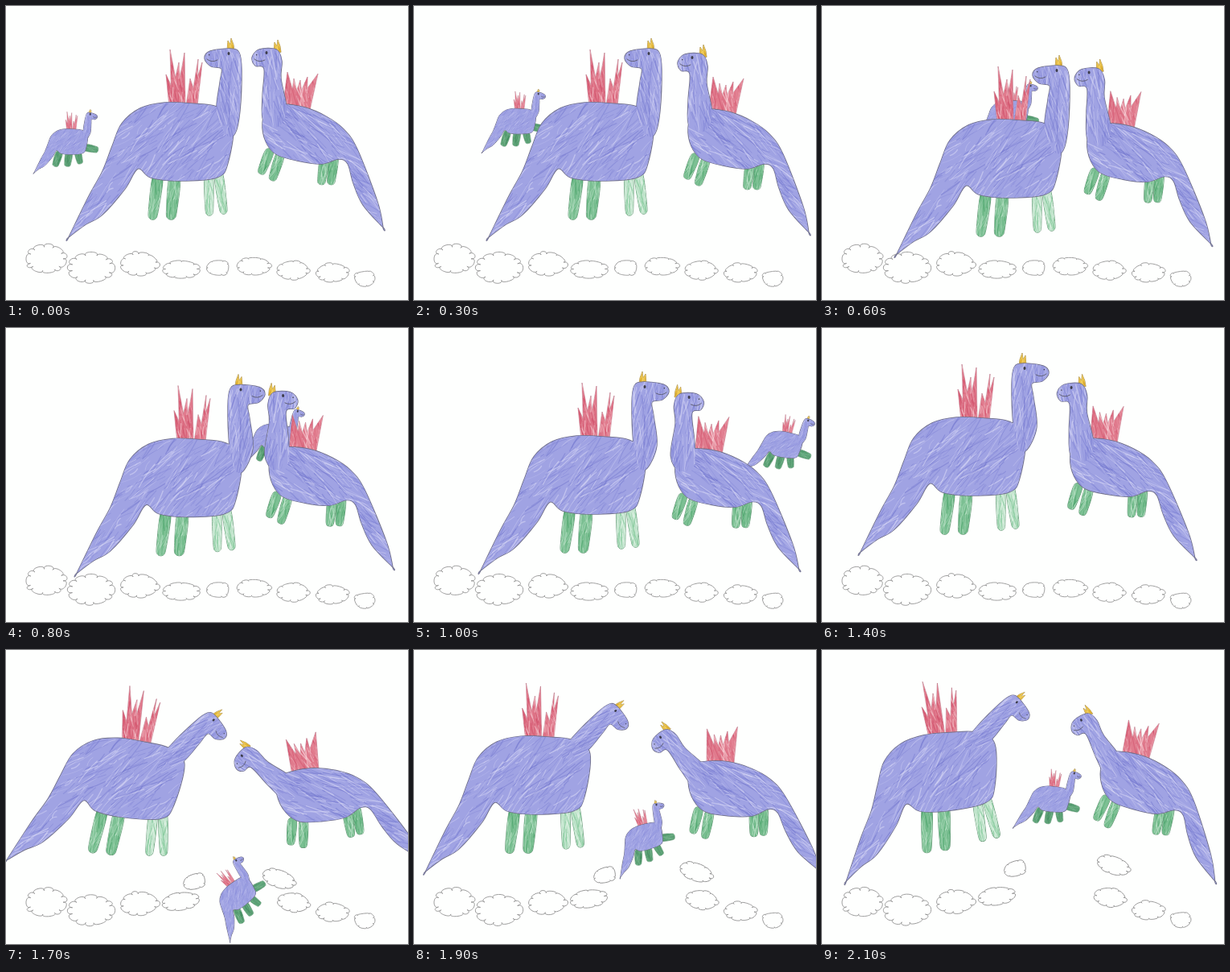
Write an HTML page with a canvas that moves like this. It is 500 px wide and 365 px high and loops after 2300 ms.

```html
<!DOCTYPE html>
<html lang="en">
<head>
<meta charset="utf-8">
<title>Flying dinosaurs</title>
<style>
html, body { margin: 0; width: 100%; height: 100%; overflow: hidden; background: #fefffe; }
canvas { display: block; }
</style>
</head>
<body>
<canvas id="stage" width="500" height="365"></canvas>
<script>
const ctx = document.getElementById('stage').getContext('2d');
const LOOP = 2300, STEP = 100, LAST = 2100;

// base, dark and light crayon tones
const BLUE = ['#a0a3e3', '#7579cf', '#dcdcf6'];
const RED = ['#e07b8d', '#cd4763', '#f9d8dd'];
const GREEN = ['#7cc093', '#3f9b60', '#cdead6'];
const DEEP = ['#5da377', '#2b7549', '#9accaa'];
const PALE = ['#bfe3ca', '#73c08d', '#f2faf4'];
const GOLD = ['#ecc344', '#cb9a28', '#f7df8a'];

const ramp = (t, a, b) => Math.max(0, Math.min(1, (t - a) / (b - a)));

function random(seed) {
  return () => {
    seed = (seed * 16807 + 11) % 2147483647;
    return seed / 2147483647;
  };
}

// Closed spline through the points; a doubled point is a sharp corner.
function spline(p) {
  const path = new Path2D(), n = p.length / 2;
  const at = i => [p[((i + n) % n) * 2], p[((i + n) % n) * 2 + 1]];
  path.moveTo(...at(0));
  for (let i = 0; i < n; i++) {
    const [a, b, c, d] = [at(i - 1), at(i), at(i + 1), at(i + 2)];
    path.bezierCurveTo(b[0] + (c[0] - a[0]) / 6, b[1] + (c[1] - a[1]) / 6,
      c[0] - (d[0] - b[0]) / 6, c[1] - (d[1] - b[1]) / 6, ...c);
  }
  return path;
}

function polygon(p) {
  const path = new Path2D();
  for (let i = 0; i < p.length; i += 2) path.lineTo(p[i], p[i + 1]);
  path.closePath();
  return path;
}

// A crayon-filled shape with its hatching worked out once.
function shape(p, colors, angle, build = spline) {
  const xs = p.filter((v, i) => i % 2 === 0), ys = p.filter((v, i) => i % 2);
  const x = Math.min(...xs), y = Math.min(...ys);
  const w = Math.max(...xs) - x, h = Math.max(...ys) - y;
  const rnd = random(6839 + Math.round(w * h));
  const hatch = [];
  const count = Math.min(480, 14 + w * h / 32);
  for (let i = 0; i < count; i++) {
    const a = angle + (rnd() - 0.5) * 0.7, len = 4 + rnd() * Math.min(18, Math.max(w, h) / 4);
    const cx = x + rnd() * w, cy = y + rnd() * h;
    const dx = Math.cos(a) * len, dy = Math.sin(a) * len, bow = (rnd() - 0.5) * 5;
    const line = new Path2D();
    line.moveTo(cx - dx, cy - dy);
    line.quadraticCurveTo(cx + bow, cy + bow, cx + dx, cy + dy);
    hatch.push({ line, dark: rnd() < 0.55, alpha: 0.2 + rnd() * 0.4, width: 0.6 + rnd() * 0.9 });
  }
  return { path: build(p), colors, hatch };
}

function edge(s, color, width) {
  ctx.strokeStyle = color;
  ctx.lineWidth = width;
  ctx.stroke(s.path);
}

function fill(s) {
  ctx.save();
  ctx.clip(s.path);
  ctx.fillStyle = s.colors[0];
  ctx.fill(s.path);
  for (const m of s.hatch) {
    ctx.globalAlpha = m.alpha;
    ctx.strokeStyle = s.colors[m.dark ? 1 : 2];
    ctx.lineWidth = m.width;
    ctx.stroke(m.line);
  }
  ctx.restore();
}

// A leg from hip to rounded foot.
function leg(x1, y1, x2, y2, w, colors) {
  const angle = Math.atan2(y2 - y1, x2 - x1), len = Math.hypot(x2 - x1, y2 - y1);
  const at = (along, side) => [
    x1 + Math.cos(angle) * along - Math.sin(angle) * side,
    y1 + Math.sin(angle) * along + Math.cos(angle) * side
  ];
  const r = w / 2;
  return shape([...at(0, r), ...at(len * 0.8, r), ...at(len, r * 0.6), ...at(len, -r * 0.6),
    ...at(len * 0.8, -r), ...at(0, -r)], colors, angle);
}

// Flames rising from a base line to each tip, with valleys between.
function spikes(x0, x1, base, ...tips) {
  const p = [x0, base];
  tips.forEach(([x, y], i) => {
    p.push(x, y);
    const next = tips[i + 1];
    if (!next) return;
    const low = Math.max(y, next[1]);
    p.push((x + next[0] + (x0 + x1) / 2) / 3, low + (base - low) * 0.35);
  });
  return shape([...p, x1, base], RED, 1.45, polygon);
}

function crown(x, y) {
  return shape([x, y, x + 1, y - 12, x + 4, y - 7, x + 5, y - 15, x + 8, y - 7, x + 9, y],
    GOLD, 1.5, polygon);
}

const left = {
  center: [215, 170], pivot: [274, 117], axis: 279.5, place: [0, 0], scale: 1,
  body: shape([78, 287, 78, 287, 103, 236, 120, 205, 132, 174, 144, 146, 167, 127, 197, 120, 230, 121,
    262, 125, 283, 142, 276, 195, 262, 213, 215, 217, 180, 213, 164, 202, 148, 227, 120, 259, 98, 272],
    BLUE, -0.75),
  neck: shape([262, 132, 266, 95, 268, 78, 255, 75, 247, 65, 254, 56, 279, 53, 290, 58, 293, 80,
    291, 130, 285, 158, 274, 160], BLUE, 1.45),
  legs: [leg(189, 211, 182, 264, 12, GREEN), leg(210, 212, 205, 264, 13, GREEN),
    leg(252, 210, 253, 259, 10, PALE), leg(264, 207, 271, 257, 10, PALE)],
  wings: [spikes(203, 223, 124, [199, 85], [204, 54], [215, 70], [222, 58]),
    spikes(224, 238, 124, [229, 90], [239, 66], [244, 70])],
  crown: crown(275, 55), eye: [277, 59], mouth: [250, 66]
};

const right = {
  center: [370, 155], pivot: [345, 140], axis: 331.5, place: [0, 0], scale: 1,
  body: shape([469, 275, 469, 275, 462, 243, 437, 178, 420, 153, 398, 137, 372, 126, 344, 122, 326, 125,
    319, 145, 323, 168, 336, 184, 362, 192, 392, 196, 414, 190, 425, 196, 432, 220, 444, 247], BLUE, 0.65),
  neck: shape([320, 142, 319, 112, 321, 78, 310, 74, 306, 64, 315, 54, 336, 54, 343, 68, 342, 90,
    349, 130, 338, 150], BLUE, 1.4),
  legs: [leg(328, 180, 317, 208, 10, GREEN), leg(341, 185, 331, 216, 10, GREEN),
    leg(396, 190, 392, 221, 10, GREEN), leg(408, 188, 404, 221, 10, GREEN)],
  wings: [spikes(344, 378, 129, [350, 82], [358, 90], [366, 92], [375, 88], [388, 84])],
  crown: crown(333, 57), eye: [324, 58], mouth: [309, 66]
};

const baby = {
  ...left, center: [71.5, 173.5], place: [9.6, 113.7], scale: 0.325,
  legs: [leg(175, 210, 158, 262, 24, DEEP), leg(212, 210, 205, 262, 24, DEEP),
    leg(245, 210, 255, 252, 22, DEEP), leg(272, 190, 322, 200, 24, DEEP)]
};

// time, dx, dy, turn, neck bend
const leftKeys = [[0, 0, 0, 0, 0], [150, 8, -19, 0, 0], [300, 15, 0, 0, 0], [600, 15, 21, 0, 0],
  [1000, 5, 14, 0, 0], [1250, -18, -19, 0, 0], [1400, -30, -9, 0, 0],
  [1700, -64, -9, 0.12, 0.72], [2100, -64, -17, -0.13, 0.95]];
const rightKeys = [[0, 0, 0, 0, 0], [300, 22, 6, 0, 0], [600, 11, 23, -0.03, 0], [1000, 6, 27, -0.03, 0],
  [1400, -10, 14, -0.04, 0], [1700, 19, 20, -0.3, -0.52], [2100, 27, 6, 0.06, -0.53]];

function pose(keys, t) {
  let i = 0;
  while (i < keys.length - 2 && t >= keys[i + 1][0]) i++;
  const a = keys[i], b = keys[i + 1], k = ramp(t, a[0], b[0]);
  return a.slice(1).map((v, j) => v + (b[j + 1] - v) * k);
}

// The little one speeds off to the right in an arc, then comes up through the clouds.
function babyPose(t) {
  const s = t / 1000;
  if (t < 1400) return [75 * s + 305 * s * s, -110 * s + 85 * s * s, 0.15 * ramp(t, 600, 1000), 0.2];
  const left = (LAST - t) / 400;
  return [206 + 8 * left, 16 + 123 * left ** 1.3, 0.08 - 0.77 * Math.min(1, left), 0.2];
}

// Lobed ring around an ellipse.
function puff(w, h, seed) {
  const rnd = random(seed * 4391), path = new Path2D();
  const n = Math.round((w + h) / 9) + 1, slice = Math.PI * 2 / n, first = rnd() * 6;
  const at = (a, k) => [Math.cos(a) * w / 2 * k, Math.sin(a) * h / 2 * k];
  const cuts = Array.from({ length: n }, (_, i) => first + (i + (rnd() - 0.5) * 0.5) * slice);
  cuts.push(cuts[0] + Math.PI * 2);
  path.moveTo(...at(cuts[0], 0.78));
  for (let i = 0; i < n; i++) {
    const a = cuts[i], b = cuts[i + 1], k = 1.04 + rnd() * 0.1, out = (b - a) * 0.08;
    path.bezierCurveTo(...at(a - out, k), ...at(b + out, k), ...at(b, 0.78));
  }
  return path;
}

// x, y, width, height
const clouds = [[50, 314, 54, 38], [106, 325, 62, 40], [166, 320, 52, 31], [218, 327, 50, 24],
  [264, 325, 33, 22], [308, 323, 46, 24], [357, 328, 43, 26], [406, 331, 44, 25], [446, 338, 29, 23]
].map(([x, y, w, h], i) => ({ x, y, path: puff(w, h, i + 3) }));

// The gap opens around x = 287 and nearer clouds are pushed further.
function drawCloud({ x, y, path }, t) {
  const open = ramp(t, 1500, 1700), drift = ramp(t, 1700, 2100);
  const d = Math.abs(x - 287), side = Math.sign(x - 287);
  const near = 1.5 * Math.exp(-((d / 35) ** 2));
  const lift = 85 * Math.exp(-d / 50) * (0.7 * open + 0.3 * drift);
  ctx.save();
  ctx.translate(x + near * (side * (30 * open + 8 * drift) + 14 * drift), y - lift);
  ctx.rotate(side * 0.45 * Math.exp(-d / 60) * open);
  ctx.strokeStyle = '#929292';
  ctx.lineWidth = 0.9;
  ctx.stroke(path);
  ctx.restore();
}

function turn([x, y], angle, size = 1) {
  ctx.translate(x, y);
  ctx.rotate(angle);
  ctx.scale(size, size);
  ctx.translate(-x, -y);
}

function face([ex, ey], [mx, my], line) {
  ctx.fillStyle = '#3c3c4a';
  ctx.beginPath();
  ctx.ellipse(ex, ey, 1.5 * line, 2 * line, 0, 0, 7);
  ctx.fill();
  ctx.fillRect(mx + 2, my - 6, 1.3, 1.3);
  ctx.strokeStyle = '#5a5a6c';
  ctx.lineWidth = 0.9 * line;
  ctx.beginPath();
  ctx.moveTo(mx, my);
  ctx.quadraticCurveTo(mx + 6, my + 5, mx + 13, my + 1);
  ctx.stroke();
}

function drawDino(d, [dx, dy, angle, bend], flip) {
  const line = d.scale ** -0.7;
  const inNeck = draw => {
    ctx.save();
    turn(d.pivot, bend, 1 - 0.18 * Math.abs(bend));
    if (flip) {
      ctx.translate(d.axis * 2, 0);
      ctx.scale(-1, 1);
    }
    draw();
    ctx.restore();
  };
  ctx.save();
  ctx.translate(dx, dy);
  turn(d.center, angle);
  ctx.translate(...d.place);
  ctx.scale(d.scale, d.scale);
  for (const s of d.legs) {
    edge(s, '#6a9a7a', line);
    fill(s);
  }
  for (const s of d.wings) {
    edge(s, '#bd7a8a', 0.7 * line);
    fill(s);
  }
  inNeck(() => {
    edge(d.crown, '#a58b46', 0.8 * line);
    fill(d.crown);
    edge(d.neck, '#70708a', 1.4 * line);
  });
  edge(d.body, '#70708a', 1.4 * line);
  fill(d.body);
  inNeck(() => {
    fill(d.neck);
    face(d.eye, d.mouth, line);
  });
  ctx.restore();
}

function draw(now) {
  const t = Math.min(LAST, Math.floor((now % LOOP) / STEP) * STEP);
  ctx.fillStyle = '#fefffe';
  ctx.fillRect(0, 0, 500, 365);
  for (const c of clouds) drawCloud(c, t);
  drawDino(baby, babyPose(t), true);
  drawDino(left, pose(leftKeys, t), t >= 800);
  drawDino(right, pose(rightKeys, t), t >= 800 && t < 1200);
}

ctx.lineJoin = 'round';
ctx.lineCap = 'round';
const start = performance.now();
function tick() {
  draw(performance.now() - start);
  requestAnimationFrame(tick);
}
tick();
</script>
</body>
</html>
```
